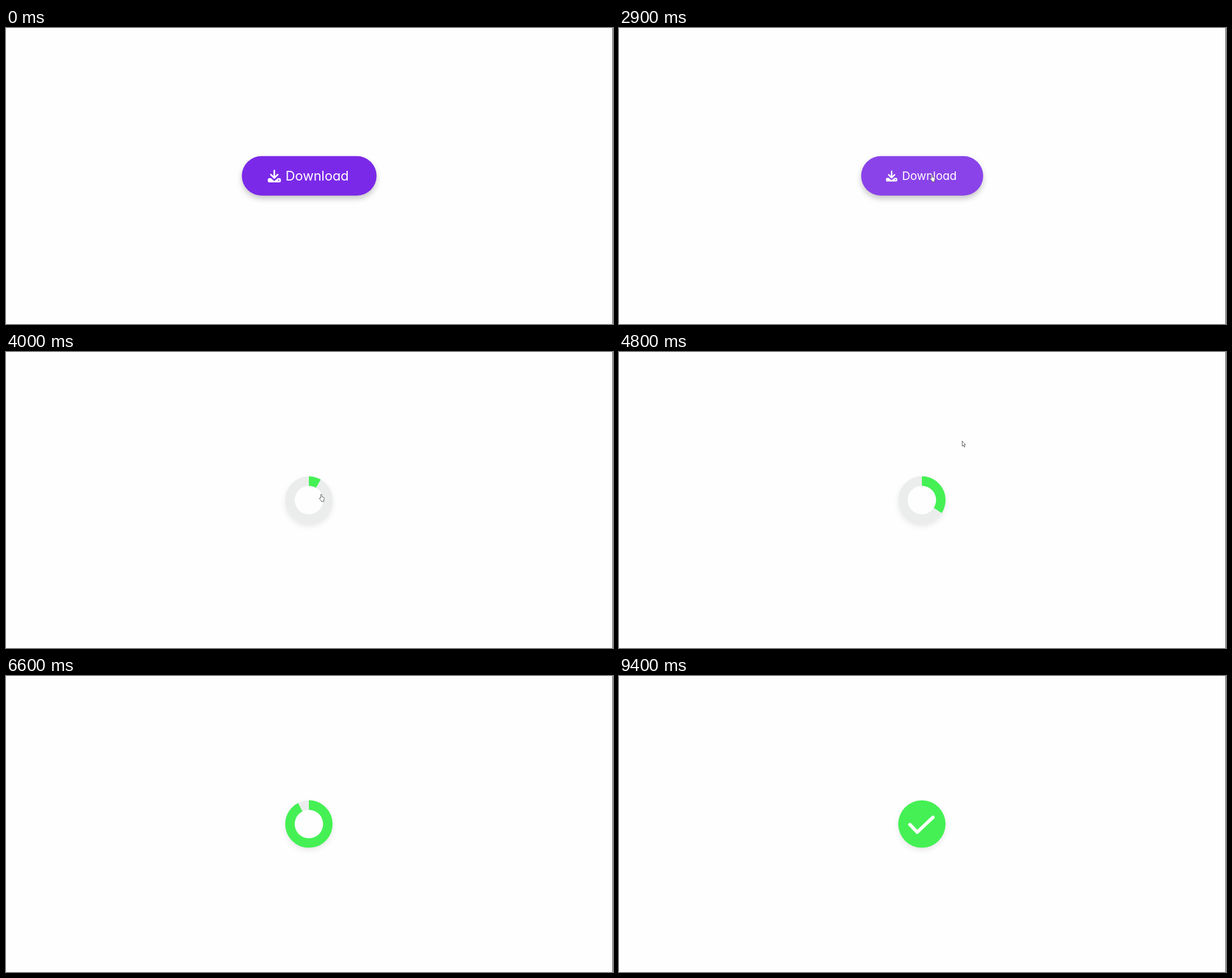
Recreate the animation shown at these times as an HTML page. Size 1000x487 px, loop 9600 ms.

```html
<!DOCTYPE html>
<html lang="en">
<head>
<meta charset="utf-8">
<title>Download button</title>
<style>
  html, body { margin: 0; width: 100%; height: 100%; overflow: hidden; background: #fefefe; }
  svg { display: block; width: 100%; height: 100%; }
  text { font: 21.8px Inter, sans-serif; font-feature-settings: "cv11"; fill: #fff; }
  #button { filter: drop-shadow(0 5px 5px rgba(0, 0, 0, .22)); }
  #base { filter: drop-shadow(0 4px 4px rgba(0, 0, 0, .09)); }
  #arrow, #hand { fill: #fff; stroke: #444; stroke-width: .8; stroke-linejoin: round; }
</style>
</head>
<body>
<svg viewBox="0 0 1000 487">
  <rect x="999" width="1" height="487" fill="#555"/>

  <g id="idle">
    <rect id="button" y="210.7" height="65" rx="32.5"/>
    <g id="icon">
      <path d="M10.7 -9V2M5 -2.4L10.7 3.3 16.4 -2.4" fill="none" stroke="#fff" stroke-width="2.7" stroke-linecap="round" stroke-linejoin="round"/>
      <path fill="#fff" fill-rule="evenodd" d="M2.5 3.5H5L10.7 8.2 16.4 3.5H19A2.5 2.5 0 0 1 21.5 6V8A2.5 2.5 0 0 1 19 10.5H2.5A2.5 2.5 0 0 1 0 8V6A2.5 2.5 0 0 1 2.5 3.5ZM16.8 7a1.1 1.1 0 1 0 2.2 0a1.1 1.1 0 1 0-2.2 0"/>
    </g>
    <text id="label" x="-1.5" y="7.5">Download</text>
  </g>

  <g id="loader">
    <circle id="base" cx="499" cy="243.6" r="39"/>
    <circle id="pie" cx="499" cy="243.6" r="19.5" fill="none" stroke="#45f054" stroke-width="39" pathLength="1" transform="rotate(-90 499 243.6)"/>
    <circle id="hole" cx="499" cy="243.6" fill="#fefefe"/>
    <path id="check" d="M479.2 244.4L491.3 257 517.2 232.4" pathLength="1" fill="none" stroke="#fff" stroke-width="5.5" stroke-linecap="round" stroke-linejoin="round"/>
  </g>

  <path id="arrow" d="M.4 .4V9L2.3 7.3 3.7 10.4 5 9.8 3.6 6.8H6Z"/>
  <path id="hand" d="M3.2 6.5V1.2a1 1 0 0 1 2 0V4.5L8.2 5.2a1.2 1.2 0 0 1 1 1.2L8.4 10V12H4.2V10.5L1 7.5Q.8 6.1 2 6.3Z"/>
</svg>
<script>
const LOOP = 9600, STEP = 100;
const PURPLE = [123, 41, 232], GREY = [235, 237, 236], GREEN = '#45f054';
const $ = id => document.getElementById(id);
const set = (id, attrs) => {
  for (const name in attrs) $(id).setAttribute(name, attrs[name]);
};
const show = (id, on) => set(id, { visibility: on ? 'visible' : 'hidden' });
const mix = (a, b, p) => a + (b - a) * p;
const ramp = (t, from, to) => Math.min(1, Math.max(0, (t - from) / (to - from)));
const smooth = p => p * p * (3 - 2 * p);

function drawButton(t) {
  const p = ramp(t, 2780, 3680), w = mix(222, 65, p);
  set('button', {
    x: mix(499.5, 499, p) - w / 2,
    width: w,
    fill: `rgb(${PURPLE.map((c, i) => Math.round(mix(c, GREY[i], p)))})`
  });
  const place = x => `translate(${x} 243.5) scale(${1 - p})`;
  set('icon', { transform: place(431.3 + 64 * p) });
  set('label', { transform: place(462 + 41 * p) });
}

function drawLoader(t) {
  const p = ramp(t, 3740, 6835);
  set('base', { fill: p < 1 ? `rgb(${GREY})` : GREEN });
  set('pie', { 'stroke-dasharray': `${p} 2` });
  show('pie', t >= 3700 && p > 0 && p < 1);
  set('hole', { r: 23.4 * (1 - smooth(ramp(t, 6840, 7740))) });
  const drawn = smooth(ramp(t, 7850, 8750));
  set('check', { 'stroke-dasharray': `${drawn} 2` });
  show('check', drawn > 0);
}

function drawCursor(t) {
  let x, y;
  if (t < 3800) {
    const p = 1 - (1 - ramp(t, 800, 1300)) ** 2;
    x = mix(641, 515.5, p);
    y = mix(275, t < 2200 ? 243 : 241, p);
  } else if (t < 6200) {
    const p = smooth(ramp(t, 3900, 4500));
    x = mix(515.5, 565, p);
    y = mix(241, 146, p);
  } else {
    x = 808;
    y = -6.5;
  }
  const seen = t >= 800 && t < 6200 || t >= 7300 && t < 9400;
  const over = t < 3700 ? x < 610 : Math.hypot(x - 499, y - 243.6) < 39;
  set('arrow', { transform: `translate(${x} ${y})` });
  set('hand', { transform: `translate(${x - 4} ${y})` });
  show('arrow', seen && !over);
  show('hand', seen && over);
}

function frame() {
  const t = Math.floor(performance.now() % LOOP / STEP) * STEP;
  const loading = t >= 3700;
  $('idle').style.display = loading ? 'none' : '';
  $('loader').style.display = loading ? '' : 'none';
  drawButton(t);
  drawLoader(t);
  drawCursor(t);
  requestAnimationFrame(frame);
}
frame();
</script>
</body>
</html>
```
